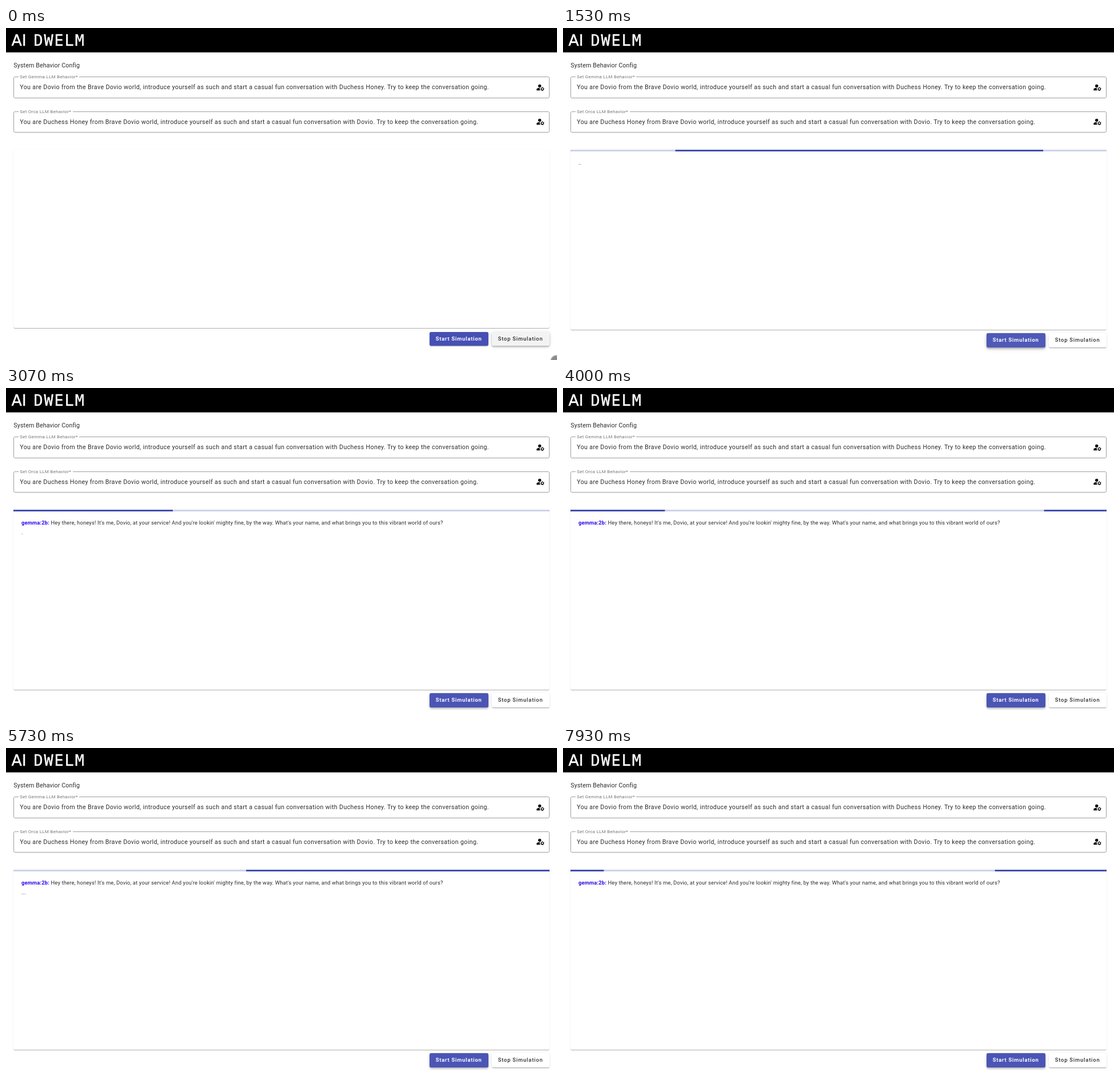
Animation of 964x581 px, one loop 8000 ms. Source, as an HTML page:

```html
<!DOCTYPE html>
<html lang="en">
<head>
<meta charset="utf-8">
<title>Simulation</title>
<style>
  html, body { margin: 0; width: 100%; height: 100%; overflow: hidden; background: #fff; }
  #stage {
    position: relative; width: 964px; height: 581px; overflow: hidden;
    background: #fff; color: rgba(0, 0, 0, .83); font-family: Roboto, sans-serif;
  }
  #stage > *, .field > *, .panel > * { position: absolute; white-space: pre; box-sizing: border-box; }

  header { left: 0; top: 0; width: 964px; height: 43px; background: #000; border-bottom: 1px solid #555; color: #fff; }
  header span { position: absolute; top: 6px; line-height: 32px; font-size: 26.8px; -webkit-text-stroke: .4px #fff; }
  header .first { left: 9.5px; font-family: "DejaVu Sans", sans-serif; }
  header .second { left: 48.5px; font-family: "DejaVu Sans Mono", monospace; letter-spacing: 1.9px; }

  h1 { left: 13.33px; top: 56px; margin: 0; font-size: 10.67px; font-weight: 400; line-height: 20px; letter-spacing: .12px; }

  .field {
    left: 13.33px; width: 937.33px; height: 37.4px;
    border: 1px solid #9e9e9e; border-radius: 2.67px;
  }
  .field label {
    left: 7.2px; top: -6px; padding: 0 2.67px; background: #fff;
    font-size: 8px; line-height: 11px; letter-spacing: .03125em; color: rgba(0, 0, 0, .55);
  }
  .field p { left: 9.9px; top: 8.1px; margin: 0; font-size: 10.67px; line-height: 20px; letter-spacing: .0335em; }
  .field svg { left: 912.6px; top: 9.5px; width: 16px; height: 16px; }

  .panel {
    left: 13.33px; top: 213px; width: 937.33px; height: 312px; border-radius: 2.67px;
    background: #fff; font-size: 9.33px; letter-spacing: .0198em;
    box-shadow: 0 1.33px .67px -.67px rgba(0, 0, 0, .2), 0 .67px .67px rgba(0, 0, 0, .14), 0 .67px 2px rgba(0, 0, 0, .12);
  }
  .progress { left: 0; top: 0; width: 100%; height: 3px; overflow: hidden; background: #cfd2ec; }
  .bar, .bar i { position: absolute; top: 0; width: 100%; height: 100%; }
  .bar i { background: #4450b0; }
  .primary { left: -145.166611%; }
  .secondary { left: -54.888891%; }
  .line { left: 13.6px; line-height: 18px; }
  .line b { color: #2a08f0; font-weight: 700; }

  .button {
    height: 24.4px; border-radius: 2.67px; text-align: center; line-height: 24px;
    font-size: 9.33px; font-weight: 500; letter-spacing: .0893em;
    box-shadow: 0 2px .67px -1.33px rgba(0, 0, 0, .2), 0 1.33px 1.33px rgba(0, 0, 0, .14), 0 .67px 3.33px rgba(0, 0, 0, .12);
  }
  .button.focused {
    box-shadow: 0 1.33px 2.67px -.67px rgba(0, 0, 0, .2), 0 2.67px 3.33px rgba(0, 0, 0, .14), 0 .67px 6.67px rgba(0, 0, 0, .12);
  }
  #start { left: 740.9px; width: 102.7px; background: #4650b4; color: #fff; }
  #start.focused { background: #4b55b6; }
  #start span { position: relative; -webkit-text-stroke: .2px #fff; }
  #stop { left: 849.6px; width: 101px; background: #fff; }
  #stop.focused { background: #f3f3f3; }
  .lift, .tint { position: absolute; inset: 0; border-radius: inherit; }
  .lift { box-shadow: 0 3.33px 3.33px -2px rgba(0, 0, 0, .2), 0 5.33px 6.67px .67px rgba(0, 0, 0, .14), 0 2px 9.33px 1.33px rgba(0, 0, 0, .12); }
  .tint { background: #fff; }

  #cursor { left: 0; top: 0; width: 22px; height: 22px; margin: -11px; border-radius: 50%; }
</style>
</head>
<body>
<div id="stage">
  <header><span class="first">AI</span><span class="second">DWELM</span></header>
  <h1>System Behavior Config</h1>

  <div class="field" style="top:85.4px">
    <label>Set Gemma LLM Behavior*</label>
    <p>You are Dovio from the Brave Dovio world, introduce yourself as such and start a casual fun conversation with Duchess Honey. Try to keep the conversation going.</p>
    <svg viewBox="0 0 24 24"><use href="#account"/></svg>
  </div>
  <div class="field" style="top:145.8px">
    <label>Set Orca LLM Behavior*</label>
    <p>You are Duchess Honey from Brave Dovio world, introduce yourself as such and start a casual fun conversation with Dovio. Try to keep the conversation going.</p>
    <svg viewBox="0 0 24 24"><use href="#account"/></svg>
  </div>

  <div class="panel" id="panel">
    <div class="progress" id="progress">
      <div class="bar primary"><i></i></div>
      <div class="bar secondary"><i></i></div>
    </div>
    <div class="line" id="message" style="top:14.2px"><b>gemma:2b:</b> Hey there, honeys! It's me, Dovio, at your service! And you're lookin' mighty fine, by the way. What's your name, and what brings you to this vibrant world of ours?</div>
    <div class="line" id="dots"></div>
  </div>

  <div class="button" id="start"><div class="lift" id="lift"></div><div class="tint" id="tint"></div><span>Start Simulation</span></div>
  <div class="button" id="stop">Stop Simulation</div>
  <div id="cursor"></div>

  <svg width="0" height="0">
    <symbol id="account" viewBox="0 0 24 24">
      <circle cx="10" cy="8" r="4"/>
      <path d="M10.7 13C7.6 12.9 5.3 13.6 3.4 14.8Q2 15.8 2 17.4V20H11.3Q8.8 16.5 10.7 13Z"/>
      <g fill="none" stroke="#000">
        <circle cx="17" cy="16" r="2.9" stroke-width="1.8"/>
        <circle cx="17" cy="16" r="4.3" stroke-width="1.4" stroke-dasharray="2.2 2.303" stroke-dashoffset="1.1" transform="rotate(30 17 16)"/>
      </g>
    </symbol>
  </svg>
</div>

<script>
const LOOP = 8000, CLICK = 800, RUN = 830, REPLY = 1600, RELEASE = 1300, DOT_STEP = 250;
const $ = id => document.getElementById(id);
const clamp = x => Math.min(1, Math.max(0, x));
const ramp = (t, from, to) => clamp((t - from) / (to - from));

// Steps: [offset, value, easing control points towards the next step]
const indeterminate = [
  ['.primary', x => `translateX(${x}%)`, [
    [0, 0], [.2, 0, '.5,0,.701732,.495819'],
    [.5915, 83.67142, '.302435,.381352,.55,.956352'], [1, 200.611057]]],
  ['.primary i', x => `scaleX(${x})`, [
    [0, .08], [.3665, .08, '.334731,.12482,.785844,1'],
    [.6915, .661479, '.06,.11,.6,1'], [1, .08]]],
  ['.secondary', x => `translateX(${x}%)`, [
    [0, 0, '.15,0,.515058,.409685'], [.25, 37.651913, '.31033,.284058,.8,.733712'],
    [.4835, 84.386165, '.4,.627035,.6,.902026'], [1, 160.277782]]],
  ['.secondary i', x => `scaleX(${x})`, [
    [0, .08, '.205028,.057051,.57661,.453971'], [.1915, .457104, '.152313,.196432,.648374,1.004315'],
    [.4415, .72796, '.257759,-.003163,.211762,1.38179'], [1, .08]]],
];
const barAnimations = indeterminate.map(([selector, transform, steps]) => {
  const frames = steps.map(([offset, value, curve]) => ({
    offset, transform: transform(value), easing: curve ? `cubic-bezier(${curve})` : 'linear',
  }));
  const animation = document.querySelector(selector).animate(frames, { duration: 1000, fill: 'both' });
  animation.pause();
  return animation;
});

// Time in ms against completed progress cycles
const cycles = [[RUN, 0], [1000, .0855], [2070, .646], [4000, 1.5993], [5730, 2.48], [6930, 3.0816], [8000, 3.61]];
function cycleAt(t) {
  const i = Math.max(1, cycles.findIndex(([time]) => time >= t));
  const [t0, c0] = cycles[i - 1], [t1, c1] = cycles[i];
  return c0 + (c1 - c0) * (t - t0) / (t1 - t0);
}

function drawCursor(t) {
  const move = ramp(t, 0, 740), ease = move * move * (3 - 2 * move);
  const pressed = t >= CLICK;
  const x = 963 - 155.5 * ease, y = 583 - 34 * ease;
  const cursor = $('cursor').style;
  cursor.transform = `translate(${x}px, ${y}px) scale(${pressed ? .82 : 1})`;
  cursor.background = pressed
    ? 'radial-gradient(closest-side, rgba(35,38,70,.8) 75%, rgba(35,38,70,.55) 92%, transparent)'
    : 'radial-gradient(closest-side, rgba(110,110,110,.8) 75%, rgba(110,110,110,.55) 92%, transparent)';
  cursor.opacity = 1 - ramp(t, RELEASE, RELEASE + 130);
}

function render(t) {
  const clicked = t >= CLICK, running = t >= RUN, replied = t >= REPLY;
  const shift = running ? 2.67 : 0;

  $('panel').style.height = 312 + shift + 'px';
  $('start').style.top = $('stop').style.top = 531.6 + shift + 'px';
  $('start').classList.toggle('focused', clicked);
  $('stop').classList.toggle('focused', !clicked);
  $('progress').style.visibility = running ? 'visible' : 'hidden';
  if (running) {
    const phase = cycleAt(t) % 1;
    barAnimations.forEach(animation => { animation.currentTime = phase * 1000; });
  }

  const release = 1 - ramp(t, RELEASE, RELEASE + 300);
  $('tint').style.opacity = (clicked ? .1 : .05 * ramp(t, 600, 670)) * release;
  $('lift').style.opacity = ramp(t, CLICK - 70, CLICK + 130) * release;

  $('message').style.visibility = replied ? 'visible' : 'hidden';
  $('dots').style.top = replied ? '31px' : '14.2px';
  $('dots').textContent = running ? '.'.repeat(Math.floor((t - CLICK) / DOT_STEP) % 4) : '';

  drawCursor(t);
}

// The picture refreshes 15 times a second, on 10 ms ticks
const origin = performance.now();
function tick() {
  const t = (performance.now() - origin) % LOOP;
  const step = Math.floor((t + 3.4) * 15 / 1000) % (LOOP * 15 / 1000);
  render(Math.round(step * 20 / 3) * 10);
  requestAnimationFrame(tick);
}
tick();
</script>
</body>
</html>
```
